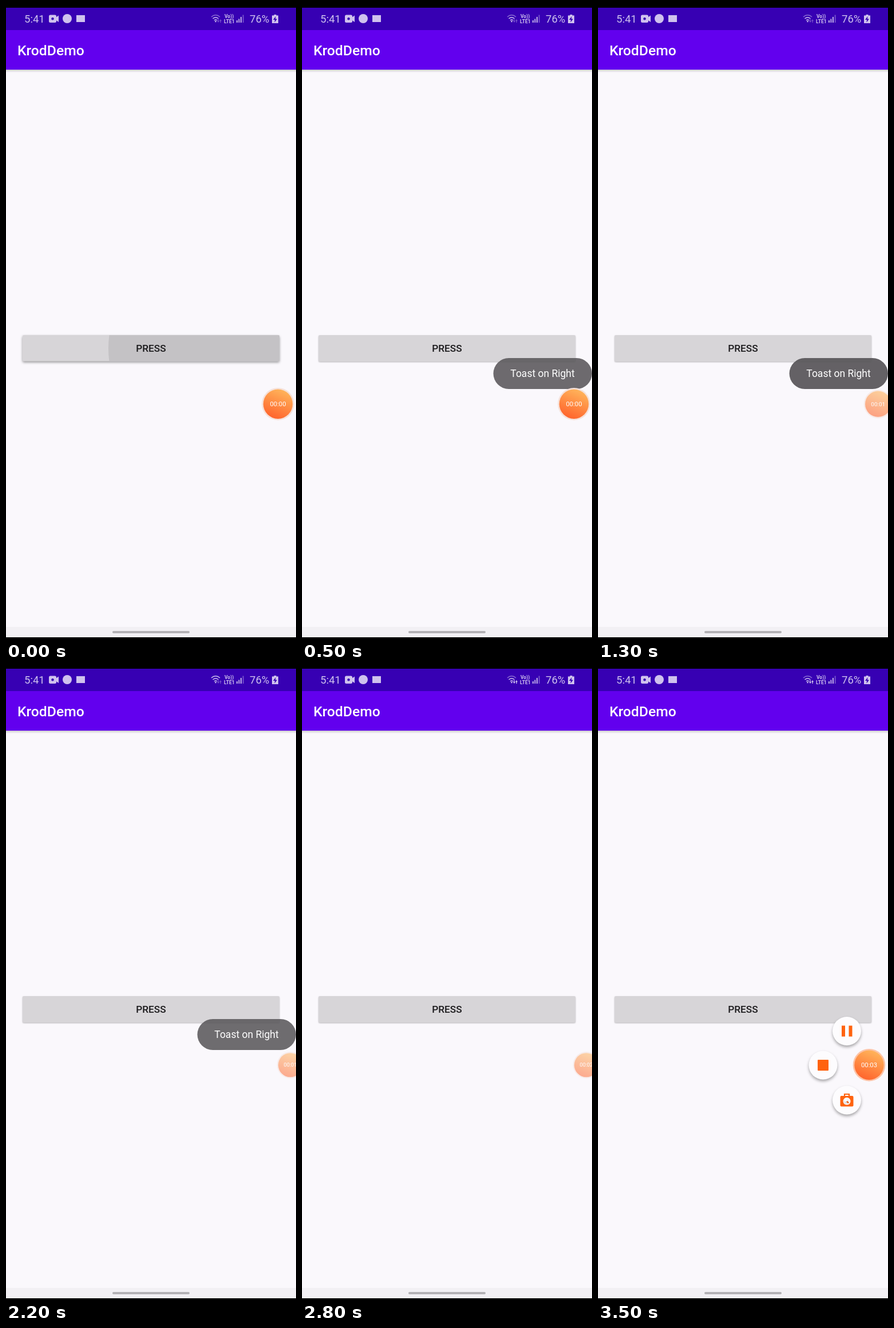
These frames come from a looping animation (507 by 1104 pixels, 3700 ms). An HTML page:

```html
<!DOCTYPE html>
<html lang="en">
<head>
<meta charset="utf-8">
<title>Toast demo</title>
<style>
  html, body { margin: 0; width: 100%; height: 100%; overflow: hidden; background: #faf8fc; }
  svg { display: block; font-family: Roboto, sans-serif; }
  .status { fill: #cfc2ee; }
  .line { fill: none; stroke: #cfc2ee; stroke-width: 1.5; }
  .mid { text-anchor: middle; }
  .action > circle { fill: #fdfcfe; filter: drop-shadow(0 3px 2.5px #0005); }
  .action { fill: #ff630f; }
</style>
</head>
<body>
<svg width="507" height="1104" viewBox="0 0 507 1104">
  <defs>
    <linearGradient id="orange" x1=".3" y1="1" x2=".7" y2="0">
      <stop offset="0" stop-color="#ff622b"/>
      <stop offset="1" stop-color="#ffb65c"/>
    </linearGradient>
    <linearGradient id="barShadow" x2="0" y2="1">
      <stop offset="0" stop-color="#000" stop-opacity=".18"/>
      <stop offset="1" stop-color="#000" stop-opacity="0"/>
    </linearGradient>
    <clipPath id="buttonClip"><rect x="29" y="574" width="449" height="45.5" rx="2"/></clipPath>
  </defs>

  <rect width="507" height="1104" fill="#faf8fc"/>
  <rect y="111" width="507" height="5" fill="url(#barShadow)"/>
  <rect y="42" width="507" height="69" fill="#6200ee"/>
  <rect y="3" width="507" height="39" fill="#3700b3"/>
  <rect width="507" height="3"/>
  <rect y="1083" width="507" height="18" fill="#f2f0f4"/>
  <rect y="1101" width="507" height="3"/>
  <rect x="186" y="1090" width="135" height="4" rx="2" fill="#b3b1b5"/>
  <text x="20" y="86" font-size="24.7" font-weight="500" fill="#fff">KrodDemo</text>

  <g class="status">
    <text x="32" y="29" font-size="18.5">5:41</text>
    <rect x="75" y="15.5" width="13" height="13.5" rx="2.5"/>
    <path d="M87 20l5-3.5v11.5l-5-3.5z"/>
    <circle cx="81.500" cy="22.200" r="2.200" fill="#3700b3"/>
    <circle cx="107" cy="22" r="8"/>
    <rect x="123" y="16" width="15" height="12"/>
    <g id="wifi" class="line">
      <path d="M359 19q7.500-6.500 15 0"/>
      <path d="M361.500 22q5-4 10 0M364 25q2.500-2 5 0"/>
    </g>
    <circle cx="366.500" cy="27" r="1.300"/>
    <path id="arrows" d="M369 26l2 3 2-3h-1.300v-3h-1.400v3zM373 26l2-3 2 3h-1.300v3h-1.400v-3z"/>
    <text x="382" y="21" font-size="8.500" font-weight="700">Vo))</text>
    <text x="381" y="30" font-size="8.500" font-weight="700">LTE1</text>
    <path d="M403 25h1.800v4h-1.800zM406.500 22.500h1.800v6.500h-1.800zM410 19h1.800v10h-1.800z"/>
    <path d="M413.700 15.500h1.800v13.500h-1.800z" opacity=".45"/>
    <text x="426" y="29" font-size="18.500">76%</text>
    <path d="M468.500 15h4v1.500h3.500v13.500h-11v-13.500h3.500z"/>
    <path d="M471.500 18l-4.500 6h3l-.5 4.500 4.500-6h-3z" fill="#3700b3"/>
  </g>

  <rect id="button" x="29" y="574" width="449" height="46" rx="2" fill="#d7d5d8"/>
  <circle id="ripple" cy="597" fill="#c4c2c5" clip-path="url(#buttonClip)"/>
  <text class="mid" x="253.500" y="603" font-size="17.300" font-weight="500" fill="#1b1a1c">PRESS</text>

  <g id="toast">
    <rect x="334.500" y="614" width="172.500" height="54" rx="27" fill="#59575a" fill-opacity=".93"/>
    <text class="mid" x="420.500" y="646.500" font-size="17.500" fill="#fff">Toast on Right</text>
  </g>

  <g class="action">
    <circle r="25"/>
    <path d="M-9-9.500h6v19h-6zM3.500-9.500h6v19h-6z"/>
  </g>
  <g class="action">
    <circle r="25"/>
    <rect x="-9.500" y="-9.500" width="19" height="19" rx="1"/>
  </g>
  <g class="action">
    <circle r="25"/>
    <path d="M-4-7v-3.500h8v3.500" fill="none" stroke="#ff630f" stroke-width="2.200"/>
    <rect x="-11.500" y="-7.500" width="23" height="18.500" rx="2"/>
    <circle cy="1.800" r="6.500" fill="#fff" style="filter:none"/>
    <path d="M-1 .8L3 5" stroke="#ff630f" stroke-width="2.400"/>
    <circle cx="-1.500" cy="0" r="2.500"/>
    <path d="M-2 0l-3-1 2-2z" fill="#fff"/>
  </g>

  <g id="badge">
    <circle id="ring" r="28.300"/>
    <circle r="25.700" fill="url(#orange)"/>
    <text id="timer" class="mid" y="4" font-size="11.300" fill="#fff"></text>
  </g>
</svg>
<script>
const LOOP = 3700, STEP = 100;
const $ = id => document.getElementById(id);
const set = (el, attrs) => { for (const k in attrs) el.setAttribute(k, attrs[k]); };
const clamp = x => Math.min(1, Math.max(0, x));
const mix = (a, b, p) => a + (b - a) * p;
const progress = (t, start, length) => clamp((t - start) / length);
const easeInOut = p => .5 - Math.cos(Math.PI * p) / 2;
const easeOut = p => 1 - (1 - p) ** 2;

const actions = [...document.querySelectorAll('.action')];
const actionSpots = [[435, 635], [393.5, 694.5], [435, 755.5]];

function drawButton(t) {
  const lift = 1 - progress(t, 0, 200);
  $('button').style.filter = `drop-shadow(0 ${mix(1, 2.5, lift)}px ${mix(1, 2, lift)}px rgba(0,0,0,${mix(.28, .4, lift)}))`;
  set($('button'), { height: mix(46, 45.5, lift) });
  set($('ripple'), { cx: mix(360, 253, progress(t, 0, 150)), r: 181 + t, opacity: 1 - progress(t, 0, 375) });
}

function drawBadge(t) {
  const dock = easeOut(progress(t, 1050, 600));
  const open = easeOut(progress(t, 3200, 300));
  const x = mix(mix(475.5, 497, dock), 474, open);
  const scale = mix(mix(1, .82, dock), 1, open);
  const opacity = mix(mix(1, .52, clamp(dock * 1.3)), 1, open);
  set($('badge'), { transform: `translate(${x} 694.2) scale(${scale})`, opacity });
  set($('ring'), { fill: open ? '#fdc3a6' : '#f6e1d9' });
  const seconds = [1200, 2300, 3300].filter(s => t >= s).length;
  $('timer').textContent = '00:0' + seconds;
  actions.forEach((el, i) => {
    const [ax, ay] = actionSpots[i];
    set(el, {
      transform: `translate(${mix(474, ax, open)} ${mix(694.5, ay, open)}) scale(${open})`,
      opacity: open
    });
  });
}

function draw(t) {
  drawButton(t);
  drawBadge(t);
  set($('toast'), { opacity: easeInOut(progress(t, 80, 500)) * (1 - easeInOut(progress(t, 2115, 500))) });
  set($('wifi').firstElementChild, { opacity: t >= 1700 && t < 2800 ? 1 : .55 });
  set($('arrows'), { opacity: t >= 2800 ? 1 : .4 });
}

const begin = performance.now();
function tick() {
  const t = (performance.now() - begin) % LOOP;
  draw(Math.floor(t / STEP) * STEP);
  requestAnimationFrame(tick);
}
tick();
</script>
</body>
</html>
```
